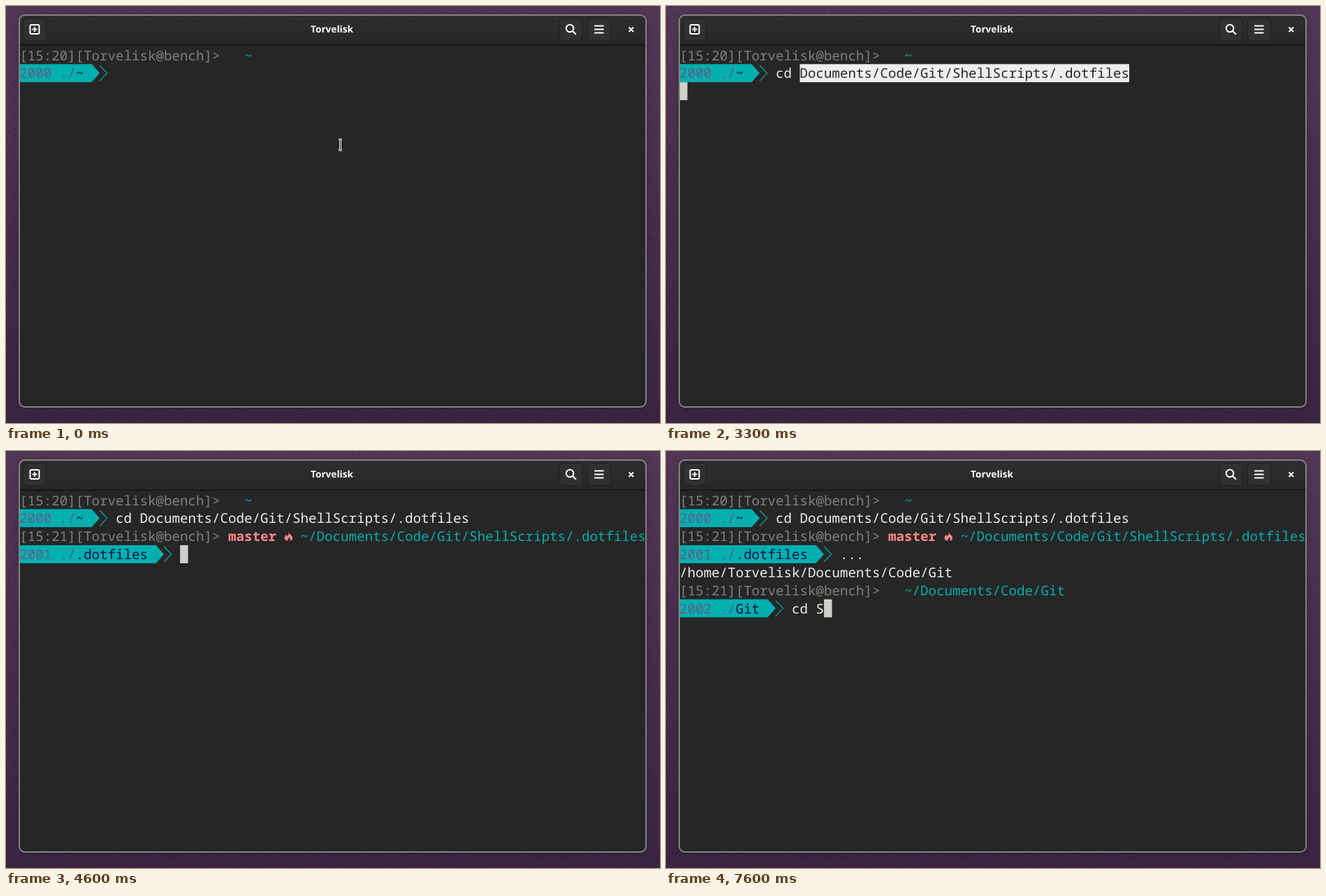
Recreate the animation shown at these times as an HTML page. Size 936x598 px, loop 8 s.

```html
<!DOCTYPE html>
<html lang="en">
<head>
<meta charset="utf-8">
<title>Terminal session</title>
<style>
  html, body { margin: 0; width: 100%; height: 100%; overflow: hidden; background: #452f4b; }
  svg { display: block; width: 936px; height: 598px; }
  text { white-space: pre; text-rendering: geometricPrecision; }
  #screen text { font: 20px "Noto Sans Mono", "DejaVu Sans Mono", monospace; }
  #screen .branch { font-weight: 700; }
  .title { font: 700 13.6px "Open Sans", "Noto Sans", sans-serif; fill: #fff; text-anchor: middle; }
  .button { fill: #303030; stroke: #1d1d1d; }
  .icon { fill: none; stroke: #fff; stroke-width: 2; }
  .shadow { filter: drop-shadow(0 2px 6px rgba(0, 0, 0, .2)); }
</style>
</head>
<body>
<svg viewBox="0 0 936 598">
  <defs>
    <linearGradient id="wall" x1="0" y1="0" x2="0" y2="1">
      <stop offset="0" stop-color="#563b58"/>
      <stop offset="1" stop-color="#3d2644"/>
    </linearGradient>
    <linearGradient id="bar" x1="0" y1="0" x2="0" y2="1">
      <stop offset="0" stop-color="#2e2e2e"/>
      <stop offset="1" stop-color="#272727"/>
    </linearGradient>
    <filter id="grain" x="0" y="0" width="1" height="1" color-interpolation-filters="sRGB">
      <feTurbulence type="fractalNoise" baseFrequency=".45" numOctaves="2" seed="4"/>
      <feColorMatrix values="0 0 0 0 0  0 0 0 0 0  0 0 0 0 0  .5 0 0 0 -.2" result="noise"/>
      <feMerge><feMergeNode in="SourceGraphic"/><feMergeNode in="noise"/></feMerge>
    </filter>
    <clipPath id="frame"><rect x="19" y="13" width="897" height="562" rx="8"/></clipPath>
    <clipPath id="strips"><path id="stripPath"/></clipPath>
    <path id="beam" d="M-2.500-7.500h1.500L0-6.500 1-7.500h1.500M0-6.500V6.500M-2.500 7.500h1.500L0 6.500 1 7.500h1.500"/>
  </defs>

  <rect id="wallpaper" width="936" height="598" fill="url(#wall)" filter="url(#grain)"/>

  <rect class="shadow" x="19" y="13" width="897" height="562" rx="8" fill="#262626"/>
  <g clip-path="url(#frame)">
    <rect x="19" y="13" width="897" height="43" fill="url(#bar)"/>
    <rect x="19" y="55" width="897" height="1.5" fill="#131313"/>
    <g id="screen" transform="scale(.958)"></g>
  </g>
  <rect x="19" y="13" width="897" height="562" rx="8" fill="none" stroke="#838383" stroke-width="2"/>

  <g class="button">
    <rect x="24.5" y="17.5" width="33" height="32" rx="5"/>
    <rect x="792" y="17.5" width="33" height="32" rx="5"/>
    <rect x="832.5" y="17.5" width="33" height="32" rx="5"/>
  </g>
  <g class="icon">
    <rect x="34.5" y="27" width="13" height="13" rx="2"/>
    <path d="M41 30v7M37.500 33.500h7"/>
    <circle cx="807" cy="32" r="5.300"/>
    <path d="M810.800 35.800l5 5M842 28.500h13.500M842 33.500h13.500M842 38.500h13.500"/>
    <path d="M891.500 30.500l6.500 6.500m0-6.500l-6.500 6.500"/>
  </g>
  <text class="title" x="466.5" y="38.3">Torvelisk</text>

  <g id="tear">
    <g clip-path="url(#strips)">
      <use href="#wallpaper"/>
      <path id="rays" fill="#eee"/>
    </g>
    <path d="M20 139v20.500H215" fill="none" stroke="#00afaf" stroke-width="2"/>
    <path d="M249 158h11.500v2.500h-11.500z" fill="#d0cfcc"/>
  </g>
  <g id="mouse" fill="none" stroke-linejoin="round">
    <use href="#beam" stroke="#fff" stroke-width="3"/>
    <use href="#beam" stroke="#111"/>
  </g>
</svg>

<script>
const LOOP = 8000, BLINK = 600;
const SCALE = .958, CELL = 12, ROW = 27, LEFT = 20, TOP = 60;
const TEAL = "#00afaf", FG = "#eeeeee", BG = "#262626", GREY = "#808080", RED = "#ff8787";
const PATH = "Documents/Code/Git/ShellScripts/.dotfiles";
const USER = "Torvelisk";
const $ = id => document.getElementById(id);
const screen = $("screen"), mouse = $("mouse");
const colX = c => LEFT + c * CELL, rowY = r => TOP + r * ROW;

function add(parent, tag, attrs, content = "") {
  const el = document.createElementNS("http://www.w3.org/2000/svg", tag);
  for (const k in attrs) el.setAttribute(k, attrs[k]);
  el.textContent = content;
  return parent.appendChild(el);
}

const cells = (g, col, row, n, fill) =>
  add(g, "rect", { x: colX(col), y: rowY(row), width: n * CELL, height: ROW, fill });
const shape = (g, d, fill, more) => add(g, "path", { d, fill, ...more });
const write = (g, col, row, s, fill, more) =>
  add(g, "text", { x: colX(col), y: rowY(row) + 21, fill, ...more }, s);

// Groups that are visible from one time until another
const timed = [{ g: $("tear"), from: 3400, to: 3500 }];
function during(from, to = LOOP) {
  const g = add(screen, "g", {});
  timed.push({ g, from, to });
  return g;
}

function header(g, row, clock, path, branch) {
  write(g, 0, row, `[${clock}][${USER}@bench]>`, GREY);
  if (branch) {
    write(g, 26, row, branch, RED, { class: "branch" });
    shape(g, "M6.500 0C7 4 12 5 12 9 12 12 10 13.500 8 13.500 9.500 11 8.500 9.500 7 8 7 10 5 10 4.500 13.500 2 13.500 0 11.500 0 9 0 6.500 2 5.500 3 4 3.500 5 3.300 6 4 6.500 6 5 6.800 3 6.500 0Z",
      RED, { transform: `translate(${colX(33)} ${rowY(row) + 7})` });
  }
  write(g, branch ? 35 : 28, row, path, TEAL);
}

function prompt(g, row, num, dir) {
  const len = 8 + dir.length, end = colX(len), y = rowY(row);
  cells(g, 0, row, len, TEAL);
  shape(g, `M${end - .5} ${y}h.500l12 13.500-12 13.500h-.500z`, TEAL);
  shape(g, `M${end + 12} ${y + 2}l11 11.500-11 11.500`, "none", { stroke: TEAL, "stroke-width": 1.2 });
  write(g, 0, row, `${num} ./`, "#5f5f87");
  write(g, 7, row, dir, "#10104c");
}

let g = during(0);
header(g, 0, "15:20", "~");
prompt(g, 1, 2000, "~");

g = during(2200, 3500);
cells(g, 15, 1, PATH.length, FG);
write(g, 15, 1, PATH, BG);

g = during(3500);
write(g, 15, 1, PATH, FG);
header(g, 2, "15:21", "~/" + PATH, "master");
prompt(g, 3, 2001, ".dotfiles");

g = during(6400);
write(g, 0, 4, `/home/${USER}/Documents/Code/Git`, FG);
header(g, 5, "15:21", "~/Documents/Code/Git");
prompt(g, 6, 2002, "Git");

// Command lines; each key press, Enter included, restarts the cursor blink
const lines = [
  { col: 12, row: 1, start: -700, text: "cd ", keys: [1200, 1300, 1400, 2000] },
  { col: 20, row: 3, start: 3400, text: "...", keys: [5700, 5900, 6000] },
  { col: 14, row: 6, start: 6400, text: "cd S", keys: [6800, 6800, 7000, 7600] }
];
for (const line of lines) line.el = write(screen, line.col, line.row, "", FG);
const block = cells(screen, 0, 0, 1, "#d0cfcc");

const show = (el, on) => { el.style.display = on ? "" : "none"; };
const at = (steps, t) => steps.findLast(s => s[0] <= t);

function drawLines(t) {
  for (const { el, text, keys } of lines)
    el.textContent = text.slice(0, keys.filter(k => k <= t).length);

  const line = lines.findLast(l => l.start <= t);
  const last = Math.max(line.start, ...line.keys.filter(k => k <= t));
  const running = t >= 2200 && t < 3500;
  show(block, Math.floor((t - last) / BLINK) % 2 === 0);
  block.setAttribute("x", colX(running ? 0 : line.col + line.el.textContent.length));
  block.setAttribute("y", rowY(running ? 2 : line.row));
}

// Torn redraw: two diagonal runs of wallpaper bands, one ragged band in each
function buildTear() {
  const width = 256, height = 33, tile = 16, x0 = 22, edge = 957;
  let seed = 7, d = "";
  const rand = () => (seed = seed * 16807 % 2147483647) / 2147483647;
  [[4, 6, 8], [11, 14, 16, 18]].forEach((bands, run) => bands.forEach((band, col) => {
    const left = x0 + col * width, bottom = (band + 1) * height;
    for (let x = left; x < Math.min(left + width, edge); x += tile) {
      const jag = col === run ? Math.floor(rand() * 3) * 12 * (1 - 2 * run) : 0;
      d += `M${x} ${band * height + jag}h${Math.min(tile, edge - x)}V${bottom}H${x}z`;
    }
  }));
  $("stripPath").setAttribute("d", d);
  $("stripPath").setAttribute("transform", `scale(${SCALE})`);

  // Sunburst on the wallpaper
  let rays = "";
  const tip = deg => {
    const a = deg * Math.PI / 180;
    return `${435 + 160 * Math.sin(a)} ${302 - 160 * Math.cos(a)}`;
  };
  for (let n = -3; n <= 6; n++) {
    const mid = -2 + 10.9 * n;
    rays += `M435 302L${tip(mid - 3)}L${tip(mid + 3)}z`;
  }
  $("rays").setAttribute("d", rays);
}
buildTear();

const glide = [[0, 478.5, 199], [200, 473, 191], [300, 470.5, 188], [700, 469.5, 187]];

function draw(t) {
  for (const { g, from, to } of timed) show(g, t >= from && t < to);
  drawLines(t);
  const [, x, y] = at(glide, t);
  mouse.setAttribute("transform", `translate(${x} ${y})`);
  show(mouse, t < lines[0].keys[0]);
}

const start = performance.now();
function tick() {
  draw((performance.now() - start) % LOOP);
  requestAnimationFrame(tick);
}
tick();
</script>
</body>
</html>
```
